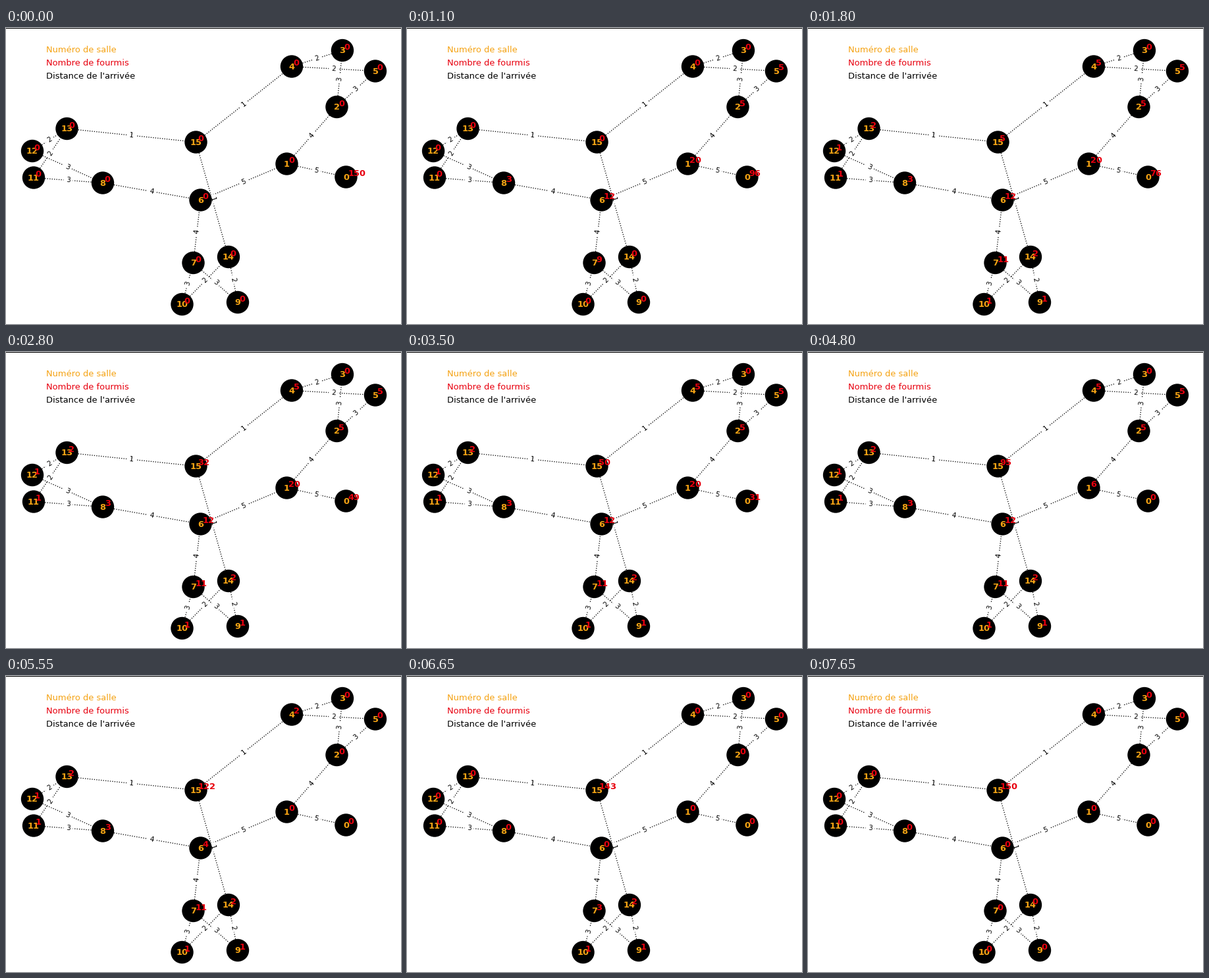
Write a matplotlib script that moves like this. It is 600 px wide and 450 px high and loops after 7.75 s.

```python
import math

import matplotlib.pyplot as plt
import numpy as np
from matplotlib.animation import FuncAnimation
from matplotlib.patches import Circle, Rectangle

W, H, DPI = 600, 450, 100
INTERVAL, FRAMES = 50, 155
PT = 9.375
RED, ORANGE = "#e8000e", "#f5a314"

ANTS, START, EXIT = 150, 0, 15

# Centre of each room
POS = [(516.5, 226.5), (426.5, 206.5), (502.5, 120), (511, 34), (434, 58.5), (561, 65.5),
       (295.5, 261.5), (284.5, 357), (147, 235.5), (352, 417), (267.5, 420), (42, 227.5),
       (40, 187), (92.5, 153), (338, 348), (288.5, 173.5)]
CAPACITY = [ANTS, 20, 5, 0, 5, 5, 12, 11, 3, 1, 1, 1, 1, 2, 2, ANTS]

# Ways on from each room, nearest the exit first: a room empties before it refills
WAYS = {4: [15], 13: [15], 14: [15], 9: [14], 10: [14], 11: [13], 12: [13], 3: [4],
        5: [4], 7: [9, 10], 8: [11, 12], 2: [5, 3], 6: [8, 7], 1: [6, 2], 0: [1]}
EDGES = [(a, b) for a, ways in WAYS.items() for b in ways]


def edge_distances():
    dist, labels = {EXIT: 0}, []
    for a, b in EDGES:
        labels.append(dist[b] + 1)
        dist[a] = min(dist.get(a, labels[-1]), labels[-1])
    return labels


def simulate():
    rooms = [0] * len(POS)
    rooms[START] = ANTS
    states = [rooms[:]]
    while rooms[EXIT] < ANTS:
        for a, b in EDGES:
            n = min(rooms[a], CAPACITY[b] - rooms[b])
            rooms[a] -= n
            rooms[b] += n
        states.append(rooms[:])
    return states


def step_at(ms):
    """Steps come slowly at first, then faster."""
    return int(np.interp(ms, [150, 3920, 7640], [1, 12, 27], left=0))


def draw_edge(a, b, dist):
    (x1, y1), (x2, y2) = sorted((POS[a], POS[b]))
    ax.plot([x1, x2], [y1, y2], color="black", lw=0.94, ls=":", zorder=1)
    ax.text((x1 + x2) / 2, (y1 + y2) / 2, str(dist), fontsize=PT * 0.8,
            rotation=math.degrees(math.atan2(y1 - y2, x2 - x1)),
            ha="center", va="center", zorder=1.5,
            bbox=dict(boxstyle="round", fc="white", ec="white", lw=0.94))


def draw_room(i, x, y):
    ax.add_patch(Circle((x, y), 17.2, fc="black", ec="none", zorder=2))
    ax.text(x, y + 4.2, str(i), color=ORANGE, fontsize=PT, weight="bold",
            ha="center", va="baseline", zorder=3)
    return ax.text(x + 2.8, y - 1.4, "0", color=RED, fontsize=PT, weight="bold",
                   ha="left", va="baseline", zorder=4)


plt.rcParams["font.family"] = "DejaVu Sans"
fig = plt.figure(figsize=(W / DPI, H / DPI), dpi=DPI, facecolor="white")
ax = fig.add_axes([0, 0, 1, 1])
ax.set_xlim(0, W)
ax.set_ylim(H, 0)
ax.axis("off")

ax.add_patch(Rectangle((0, -1), W, 2, fc="black", ec="none", snap=False))
legend = {"Numéro de salle": ORANGE, "Nombre de fourmis": RED,
          "Distance de l'arrivée": "black"}
for row, (label, color) in enumerate(legend.items()):
    ax.text(61, 37 + 20 * row, label, color=color, fontsize=PT, va="baseline")

for edge, dist in zip(EDGES, edge_distances()):
    draw_edge(*edge, dist)
counts = [draw_room(i, x, y) for i, (x, y) in enumerate(POS)]
states = simulate()


def update(frame):
    for text, n in zip(counts, states[step_at(frame * INTERVAL)]):
        text.set_text(str(n))
    return counts


anim = FuncAnimation(fig, update, frames=FRAMES, interval=INTERVAL,
                     repeat=True, repeat_delay=0, blit=False)
plt.show()
```
